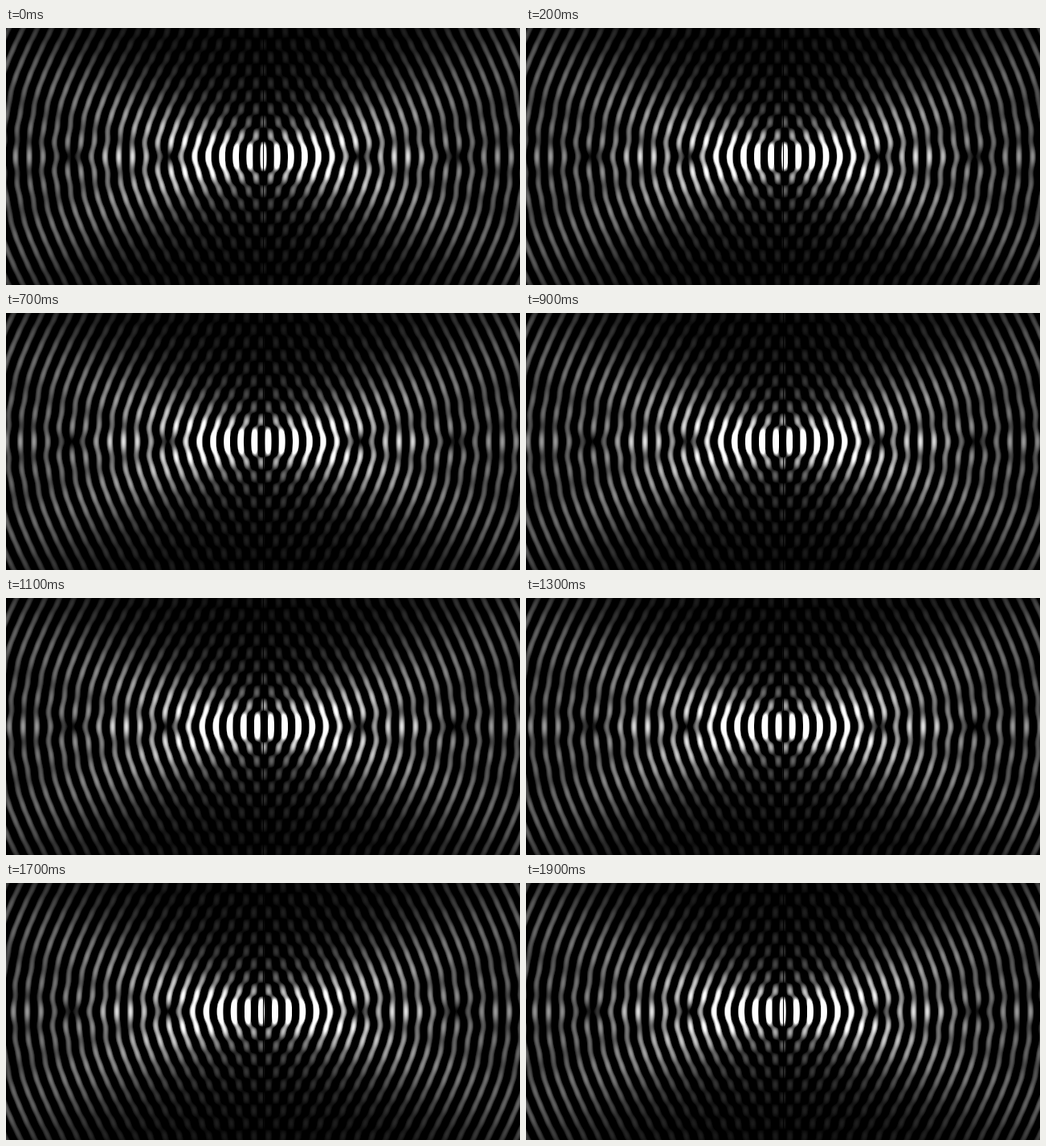
These frames come from a looping animation (640x321 px, 2 s). An HTML page with a canvas:

```html
<!DOCTYPE html>
<html lang="en">
<head>
<meta charset="utf-8">
<title>Focused wave</title>
<style>
html, body { margin: 0; width: 100%; height: 100%; overflow: hidden; background: #000; }
canvas { display: block; width: 640px; height: 321px; }
</style>
</head>
<body>
<canvas id="stage" width="640" height="321"></canvas>
<script>
const W = 640, H = 321, CX = 320, CY = 160;
const LOOP = 2000, STEPS = 20;
const K = 2 * Math.PI / 16;          // wavelength of 16 px
const COS_MAX = Math.cos(Math.PI / 6); // half angle of the cone
const GAIN = 4, GAMMA = 0.75;
const N = 80;

const ctx = document.getElementById('stage').getContext('2d');
const image = ctx.createImageData(W, H);
const pixels = new Uint32Array(image.data.buffer);

function besselJ0(x) {
  const n = 40;
  let sum = 0;
  for (let i = 0; i < n; i++) sum += Math.cos(x * Math.sin((i + 0.5) * Math.PI / n));
  return sum / n;
}

// Sum of plane waves over the cone; one quadrant is enough.
const QW = CX + 1, QH = CY + 1;
const re = new Float32Array(QW * QH), im = new Float32Array(QW * QH);
for (let i = 0; i < N; i++) {
  const c = COS_MAX + (1 - COS_MAX) * (i + 0.5) / N;
  const s = Math.sqrt(1 - c * c);
  for (let r = 0; r < QH; r++) {
    const j = besselJ0(K * r * s) / N;
    for (let z = 0; z < QW; z++) {
      re[r * QW + z] += j * Math.cos(K * z * c);
      im[r * QW + z] += j * Math.sin(K * z * c);
    }
  }
}

const shades = Uint32Array.from({ length: 1025 }, (_, i) => {
  const v = Math.round(255 * Math.pow(i / 1024, GAMMA));
  return (0xff000000 | v * 0x010101) >>> 0;
});

function draw(phase) {
  const a = Math.cos(phase) * GAIN * 1024;
  const b = Math.sin(phase) * GAIN * 1024;
  for (let y = 0; y < H; y++) {
    const row = Math.abs(y - CY) * QW;
    for (let x = 0; x < W; x++) {
      const z = x - CX;
      const q = row + Math.abs(z);
      // The focal column itself stays dark.
      const u = z === 0 ? 0 : a * re[q] + Math.sign(z) * b * im[q];
      pixels[y * W + x] = shades[Math.max(0, Math.min(1024, Math.round(u)))];
    }
  }
  ctx.putImageData(image, 0, 0);
}

const start = performance.now();
let shown = -1;
function tick() {
  const t = Math.max(0, performance.now() - start) % LOOP;
  const step = Math.floor(t / LOOP * STEPS);
  if (step !== shown) {
    shown = step;
    draw(2 * Math.PI * step / STEPS);
  }
  requestAnimationFrame(tick);
}
tick();
</script>
</body>
</html>
```
